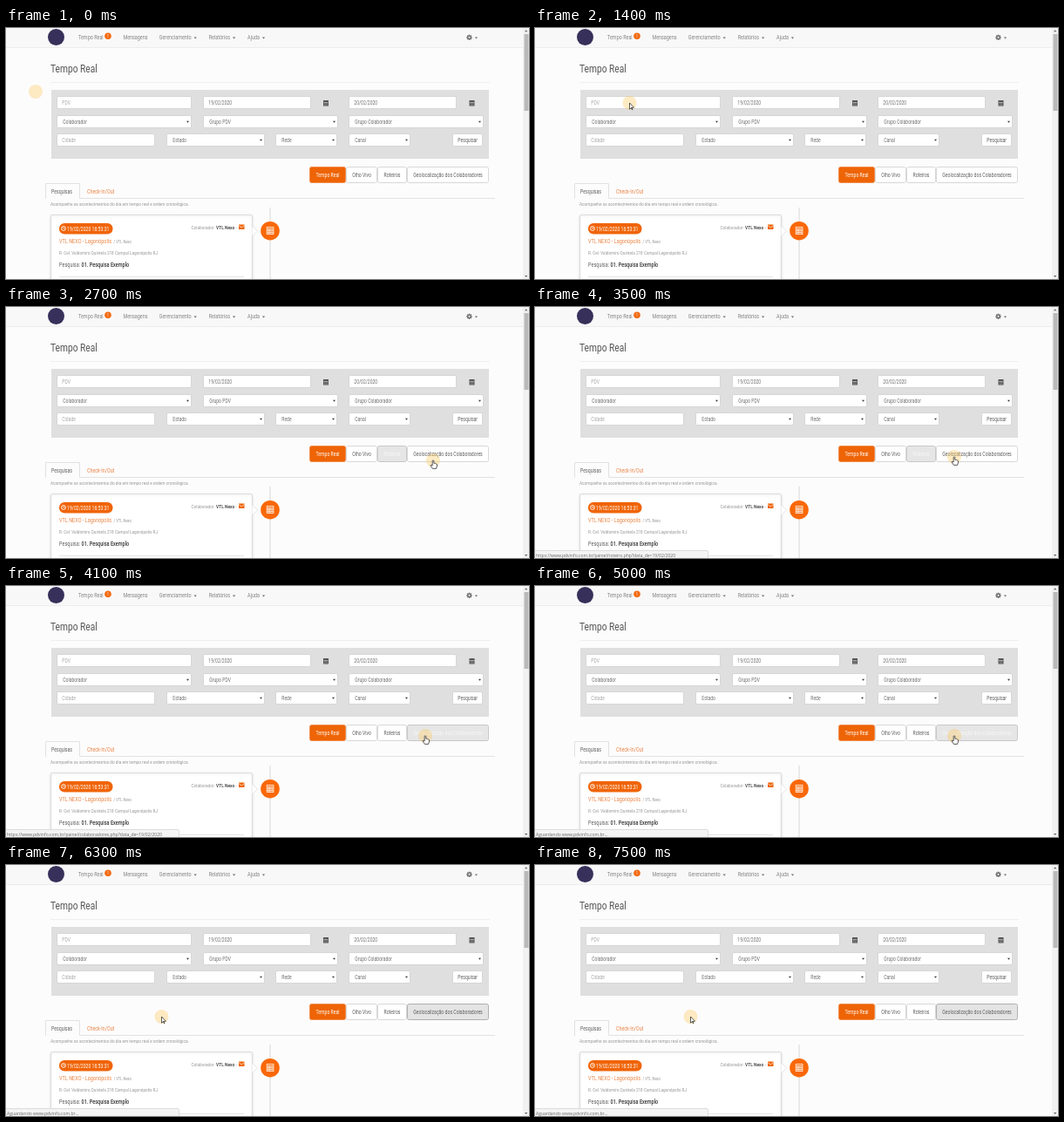
Animation, 600 px wide and 288 px high, one loop 8 s. Source, as an HTML page with a canvas:

```html
<!DOCTYPE html>
<html lang="pt-BR">
<head>
<meta charset="utf-8">
<title>Tempo Real</title>
<style>
html, body { margin: 0; width: 100%; height: 100%; overflow: hidden; background: #fdfcfd; }
canvas { display: block; }
</style>
</head>
<body>
<canvas id="stage" width="600" height="288"></canvas>
<script>
const ctx = document.getElementById('stage').getContext('2d');
const LOOP = 8000, STEP = 100;
const NARROW = 0.79; // one condensed face for the whole page
const PAGE = '#fdfcfd', ORANGE = '#ee6406', LINK = '#ea8445';
const INK = '#606060', SOFT = '#858585', EDGE = '#d4d4d4';

const setFont = (size, weight = 400) => {
  ctx.font = `${weight} ${size}px Roboto, "Open Sans", sans-serif`;
};

// Draws text centred on cy and returns its width.
function text(str, x, cy, size, color = INK, weight = 400, align = 'left') {
  ctx.save();
  ctx.translate(x, cy + size * 0.355);
  ctx.scale(NARROW, 1);
  setFont(size, weight);
  ctx.textAlign = align;
  ctx.fillStyle = color;
  ctx.fillText(str, 0, 0);
  const width = ctx.measureText(str).width * NARROW;
  ctx.restore();
  return width;
}

function textWidth(str, size) {
  setFont(size);
  return ctx.measureText(str).width * NARROW;
}

function fill(color, x, y, w, h) {
  ctx.fillStyle = color;
  ctx.fillRect(x, y, w, h);
}

function disc(color, x, y, r) {
  ctx.fillStyle = color;
  ctx.beginPath();
  ctx.arc(x, y, r, 0, Math.PI * 2);
  ctx.fill();
}

function box(x, y, w, h, bg, border = EDGE, r = 1.5) {
  ctx.beginPath();
  ctx.roundRect(x + 0.5, y + 0.5, w - 1, h - 1, r);
  ctx.fillStyle = bg;
  ctx.fill();
  ctx.strokeStyle = border;
  ctx.lineWidth = 0.9;
  ctx.stroke();
}

function trace(...points) {
  ctx.beginPath();
  points.forEach(([x, y]) => ctx.lineTo(x, y));
}

function poly(color, ...points) {
  trace(...points);
  ctx.fillStyle = color;
  ctx.fill();
}

function line(color, width, ...points) {
  trace(...points);
  ctx.strokeStyle = color;
  ctx.lineWidth = width;
  ctx.stroke();
}

function caret(x, y, color = '#707070', r = 1.7) {
  poly(color, [x - r, y - r / 2], [x + r, y - r / 2], [x, y + r / 2 + 0.3]);
}

function gear(x, y) {
  ctx.save();
  ctx.translate(x, y);
  for (let i = 0; i < 8; i++) {
    fill('#707070', -0.7, -3.2, 1.4, 2);
    ctx.rotate(Math.PI / 4);
  }
  disc('#707070', 0, 0, 2.4);
  disc('#f9f8f9', 0, 0, 1);
  ctx.restore();
}

function calendar(x, y) {
  fill('#555', x - 3, y - 3, 6, 6.5);
  fill('#ccc', x - 2.4, y - 1, 4.8, 0.7);
  for (let i = 0; i < 6; i++) fill('#aaa', x - 2 + (i % 3) * 1.5, y + 0.4 + (i > 2) * 1.4, 0.9, 0.8);
}

function drawNav() {
  fill('#f9f8f9', 0, 0, 594, 22);
  fill('#ececec', 0, 22, 594, 1);
  disc('#37305a', 57.5, 10.5, 9.5);
  let x = 83;
  for (const label of ['Tempo Real', 'Mensagens', 'Gerenciamento', 'Relatórios', 'Ajuda']) {
    x += text(label, x, 11, 6.9, SOFT);
    if (label === 'Tempo Real') {
      disc('#f26a10', x + 5.3, 9.2, 3.8);
      text('1', x + 5.3, 9.2, 5, '#fff', 400, 'center');
      x += 9.5;
    } else if (label !== 'Mensagens') {
      caret(x + 4.5, 11.3);
      x += 6.8;
    }
    x += 13.2;
  }
  gear(531.5, 10.8);
  caret(539.5, 11.3);
}

// Filter grid: twelve columns, three rows
const colX = col => Math.round(58 + col * 41.9);
const rowY = row => Math.round(78 + row * 21.7);

function field(label, col, span, row, kind) {
  const x = colX(col), y = rowY(row), w = Math.round(span * 41.9 - 13);
  const select = kind === 'select';
  box(x, y, w, 15, '#fff');
  text(label, x + (select ? 7.3 : 6.3), y + 7.8, 6.4, kind === 'hint' ? '#aaa' : '#707070');
  if (select) caret(x + w - 4.5, y + 7.6, '#333', 1.5);
}

function drawFilters() {
  text('Tempo Real', 51, 46.5, 12.9, '#555');
  fill('#f0eff0', 51, 62, 504, 1);
  fill('#e0dfe0', 52, 71, 502, 79);

  field('PDV', 0, 4, 0, 'hint');
  ['19/02/2020', '20/02/2020'].forEach((date, i) => {
    field(date, 4 + 4 * i, 3.27, 0);
    calendar(367 + 167.5 * i, 86);
  });
  ['Colaborador', 'Grupo PDV', 'Grupo Colaborador'].forEach((label, i) => field(label, 4 * i, 4, 1, 'select'));
  field('Cidade', 0, 3, 2, 'hint');
  field('Estado', 3, 3, 2, 'select');
  field('Rede', 6, 2, 2, 'select');
  field('Canal', 8, 2, 2, 'select');
  box(512, rowY(2), 35, 15, '#fff');
  text('Pesquisar', 529.7, rowY(2) + 7.8, 6.5, INK, 400, 'center');
}

const BUTTON_LOOK = {
  idle: ['#fff', EDGE, INK],
  main: [ORANGE, '#f08a48', '#fff'],
  hover: ['#e6e6e6', '#c4c4c4', '#f6f6f6'],
  focus: ['#e4e4e4', '#aaa', INK]
};

function drawButtons(t) {
  const states = {
    'Tempo Real': 'main',
    'Olho Vivo': 'idle',
    'Roteiros': t >= 2400 && t < 3800 ? 'hover' : 'idle',
    'Geolocalização dos Colaboradores': t < 3800 ? 'idle' : t < 5500 ? 'hover' : 'focus'
  };
  let x = 348;
  for (const [label, state] of Object.entries(states)) {
    const [bg, border, ink] = BUTTON_LOOK[state];
    const next = x + textWidth(label, 6.5) + 14.6;
    const left = Math.round(x), w = Math.round(next) - left;
    box(left, 159, w, 19, bg, border, 2);
    text(label, left + w / 2, 168.6, 6.5, ink, 400, 'center');
    x = next;
  }
}

function drawTabs() {
  line('#e2e2e2', 1, [45.5, 196], [45.5, 178.5], [84.5, 178.5], [84.5, 195.5], [561, 195.5]);
  text('Pesquisas', 52, 187.5, 6.6, INK);
  text('Check-In/Out', 93, 187.5, 6.8, LINK);
  text('Acompanhe os acontecimentos do dia em tempo real e ordem cronológica.', 51, 202, 6.03, '#959595');
}

function drawTimeline() {
  fill('#ebeaeb', 302, 206, 2, 82);
  disc('#f96808', 303, 232.7, 10.8);
  fill('#ffe3cf', 298.8, 228, 8.6, 9);
  fill('#f96808', 299.6, 229, 7, 1);
  for (let y = 231; y < 237; y += 2) {
    fill('#f98a45', 299.6, y, 2, 1);
    fill('#f98a45', 302.4, y, 4.2, 1);
  }
}

function drawCard() {
  ctx.save();
  ctx.shadowColor = 'rgba(0,0,0,.12)';
  ctx.shadowBlur = 3;
  ctx.shadowOffsetY = 1;
  box(51, 214, 232, 84, '#fff', '#dcdcdc');
  ctx.restore();
  const arrow = [[282.5, 227], [288.5, 233], [282.5, 239]];
  poly('#fff', ...arrow);
  line('#dcdcdc', 0.8, ...arrow);

  ctx.fillStyle = '#f06408';
  ctx.beginPath();
  ctx.roundRect(61, 224, 61.5, 12.5, 6);
  ctx.fill();
  disc('#fff', 66, 230, 2.7);
  disc('#f06408', 66, 230, 1.9);
  line('#fff', 0.7, [66, 228.5], [66, 230.2], [67.2, 230.2]);
  text('19/02/2020 16:53:31', 70, 230.2, 6.5, '#fff');

  text('Colaborador:', 212.5, 229, 6, '#959595');
  text('VTL Nexo', 241, 229, 6.2, '#333', 500);
  text('-', 263.5, 229, 6, SOFT);
  fill(ORANGE, 267, 225.5, 6.5, 5.5);
  line('#fff', 0.7, [267, 226.5], [270.25, 229], [273.5, 226.5]);

  text('VTL NEXO - Lagonópolis', 61, 244.8, 7, LINK);
  text('/ VTL Nexo', 123.5, 245.3, 5.2, '#959595');
  text('R. Cel. Valdomiro Quintela 218 Campal Lagonópolis RJ', 61, 258, 5.9, '#959595');
  text('Pesquisa:', 61, 271.3, 7, INK);
  text('01. Pesquisa Exemplo', 86.5, 271.3, 7, '#333', 500);
  fill('#e4e4e4', 61, 285, 212, 1);
}

function drawScrollbar() {
  fill('#f1f1f1', 593, 0, 7, 288);
  poly('#666', [595, 4.2], [596.7, 2.2], [598.4, 4.2]);
  poly('#666', [595, 284], [596.7, 286], [598.4, 284]);
  fill('#b9b9b9', 594.5, 7, 5, 88);
}

function drawStatus(t) {
  if (t < 3000) return;
  const site = 'www.pdvinfo.com.br';
  const page = t < 3600 ? 'roteiro' : 'colaboradores';
  const label = t < 4500
    ? `https://${site}/painel/${page}.php?data_de=19/02/2020`
    : `Aguardando ${site}...`;
  box(-2, 279, 201, 12, '#f4f4f4', '#dadada');
  ctx.font = '5.03px "Open Sans", "Noto Sans", sans-serif';
  ctx.textAlign = 'left';
  ctx.fillStyle = '#666';
  ctx.fillText(label, 1, 286.7);
}

// Pointer legs: each runs from the previous stop, bowed by bend.
const HOME = { x: 34, y: 73 };
const LEGS = [
  { from: 1150, to: 2200, x: 347, y: 156, bend: -10, power: 1 },
  { from: 2200, to: 2700, x: 490, y: 176, bend: 0, power: 1.4 },
  { from: 2700, to: 3500, x: 481, y: 172, bend: 0, power: 1 },
  { from: 5400, to: 6300, x: 178.5, y: 174, bend: 15, power: 1.37 }
];

function pointerAt(t) {
  let { x, y } = HOME;
  for (const leg of LEGS) {
    if (t <= leg.from) break;
    const k = Math.min(1, (t - leg.from) / (leg.to - leg.from));
    const p = 1 - (1 - k) ** leg.power;
    x += (leg.x - x) * p;
    y += (leg.y - y) * p + leg.bend * Math.sin(Math.PI * p);
  }
  return [x, y];
}

function outline() {
  ctx.fillStyle = '#fff';
  ctx.strokeStyle = '#333';
  ctx.lineWidth = 0.8;
  ctx.fill();
  ctx.stroke();
}

function hand() {
  ctx.beginPath();
  ctx.moveTo(-0.8, 6);
  ctx.lineTo(-0.8, 0.6);
  ctx.arc(0, 0.6, 0.8, Math.PI, 0);
  ctx.lineTo(0.8, 3.2);
  ctx.quadraticCurveTo(4.8, 3.4, 4.6, 6);
  ctx.lineTo(3.6, 9.4);
  ctx.lineTo(-0.6, 9.4);
  ctx.lineTo(-3, 5.8);
  ctx.quadraticCurveTo(-2.4, 4.6, -0.8, 6);
  outline();
}

function arrow() {
  trace([0, 0], [0, 7.2], [1.8, 5.7], [4.9, 5.2]);
  ctx.closePath();
  outline();
  line('#333', 1.1, [2.2, 5.6], [3.2, 8]);
}

function drawPointer(t) {
  const [x, y] = pointerAt(t);
  disc('rgba(252,200,90,.36)', x, y, 8);
  if (t < LEGS[0].from) return;
  const overButton = x > 348 && x < 555 && y > 159 && y < 178;
  ctx.save();
  ctx.translate(x, y);
  if (overButton) hand();
  else arrow();
  ctx.restore();
}

function draw(t) {
  fill(PAGE, 0, 0, 600, 288);
  drawNav();
  drawFilters();
  drawButtons(t);
  drawTabs();
  drawTimeline();
  drawCard();
  drawScrollbar();
  drawStatus(t);
  drawPointer(t);
}

const start = performance.now();
function tick() {
  const t = (performance.now() - start) % LOOP;
  draw(Math.floor(t / STEP) * STEP);
  requestAnimationFrame(tick);
}
tick();
</script>
</body>
</html>
```
